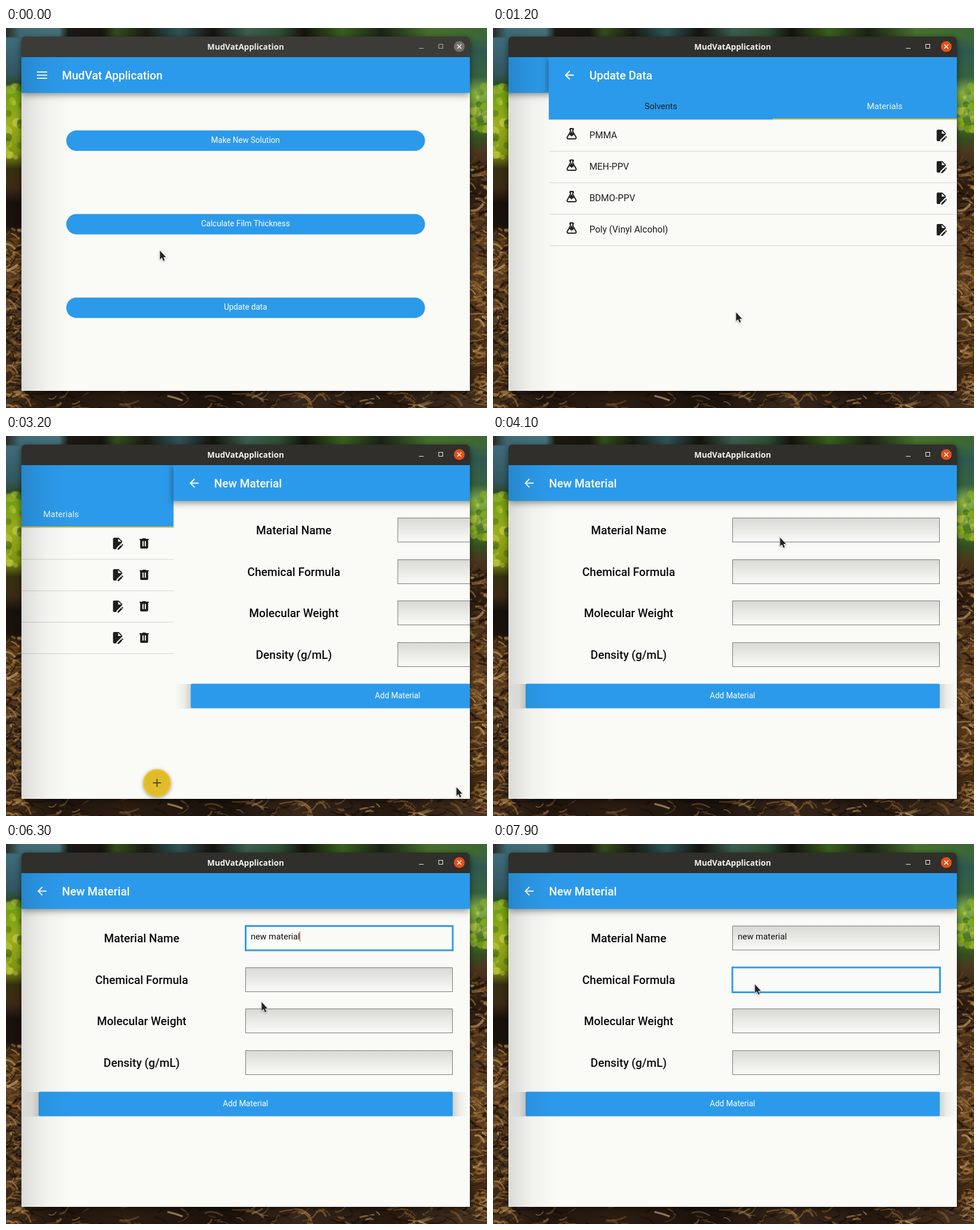
An HTML page with a canvas for the animation above (8 s loop, 842x665 px).

```html
<!DOCTYPE html>
<html lang="en">
<head>
<meta charset="utf-8">
<title>MudVat Application</title>
<style>
  html, body { margin: 0; width: 100%; height: 100%; overflow: hidden; background: #1d150e; }
  canvas { display: block; }
</style>
</head>
<body>
<canvas id="stage" width="842" height="665"></canvas>
<script>
const W = 842, H = 665, LOOP = 8000, STEP = 100;
const WIN = { x: 27, y: 15, r: 812, b: 635, top: 51 };
const PAGE_W = WIN.r - WIN.x;
const BLUE = '#2c9aea', PAPER = '#fafbf7', INK = '#1f1f1d', YELLOW = '#f7c510';
const ROWS = ['PMMA', 'MEH-PPV', 'BDMO-PPV', 'Poly (Vinyl Alcohol)'];
const LABELS = ['Material Name', 'Chemical Formula', 'Molecular Weight', 'Density (g/mL)'];

const ICON = {
  back: new Path2D('M20 11H7.8l5.6-5.6L12 4l-8 8 8 8 1.4-1.4L7.8 13H20z'),
  flask: new Path2D('M5 19a1 1 0 0 0 1 1h12a1 1 0 0 0 1-1l-.2-.6L13 8.4V4h-2v4.4L5.2 18.4zM6 22a3 3 0 0 1-2.5-4.6L9 7.8V6a1 1 0 0 1-1-1V4a2 2 0 0 1 2-2h4a2 2 0 0 1 2 2v1a1 1 0 0 1-1 1v1.800L20.500 17.400A3 3 0 0 1 18 22z'),
  drop: new Path2D('M12 8l4.300 6-2.300 1-2 2-2-2-2.300-1z'),
  file: new Path2D('M6 2a2 2 0 0 0-2 2v16a2 2 0 0 0 2 2h4v-1.900l10-10V8l-6-6zM13 3.500L18.500 9H13z'),
  pencil: new Path2D('M20.200 13l-.5.200-1 1 2.100 2.100 1-1c.2-.3.2-.6 0-.8l-1.300-1.300zM18.100 14.800L12 20.900V23h2.100l6.100-6.100z'),
  trash: new Path2D('M9 3v1H4v2h1v13a2 2 0 0 0 2 2h10a2 2 0 0 0 2-2V6h1V4h-5V3zM9 8h2v9H9zM13 8h2v9h-2z'),
  pointer: new Path2D('M0 0V15.500L3.500 12.300 5.900 18 8.300 17 6 11.400H10.400z')
};

// Pointer route: time, x, y
const ROUTE = [
  [0, 269, 389], [400, 358, 445], [500, 358, 445], [900, 425, 497], [1400, 425, 497],
  [2100, 725, 592], [2300, 749, 601], [2600, 798, 636], [2700, 798, 636], [2900, 788, 614],
  [3200, 788, 614], [3600, 602, 402], [3900, 517, 217], [4000, 517, 217], [4100, 502, 177],
  [4300, 502, 177], [4700, 440, 331], [4800, 447, 276], [6900, 447, 276], [7500, 458, 245]
];
// Typed text: time, letters shown
const TYPING = [[5100, 1], [5200, 3], [5500, 4], [5600, 5], [5700, 6], [6000, 7], [6100, 8], [6200, 10], [6300, 12]];

const c = document.getElementById('stage').getContext('2d');

function rect(x, y, w, h, fill, g = c) {
  g.fillStyle = fill;
  g.fillRect(x, y, w, h);
}

function text(str, x, y, font, fill, align = 'left') {
  c.font = font;
  c.fillStyle = fill;
  c.textAlign = align;
  c.fillText(str, x, y);
}

const roboto = (size, weight = 400) => `${weight} ${size}px Roboto, sans-serif`;

function pill(x, y, w, h, r, fill) {
  c.beginPath();
  c.roundRect(x, y, w, h, r);
  c.fillStyle = fill;
  c.fill();
}

function disc(x, y, r, fill) {
  c.beginPath();
  c.arc(x, y, r, 0, 7);
  c.fillStyle = fill;
  c.fill();
}

function line(points, width, colour) {
  c.beginPath();
  points.forEach(([x, y], i) => i ? c.lineTo(x, y) : c.moveTo(x, y));
  c.lineWidth = width;
  c.strokeStyle = colour;
  c.stroke();
}

function icon(path, x, y, fill = INK) {
  c.save();
  c.translate(x, y);
  c.fillStyle = fill;
  c.fill(path, 'evenodd');
  c.restore();
}

function ramp(g, x0, y0, x1, y1, stops) {
  const grad = g.createLinearGradient(x0, y0, x1, y1);
  stops.forEach(([at, colour]) => grad.addColorStop(at, colour));
  return grad;
}

function withShadow(alpha, blur, dy, draw) {
  c.save();
  c.shadowColor = `rgba(0,0,0,${alpha})`;
  c.shadowBlur = blur;
  c.shadowOffsetY = dy;
  draw();
  c.restore();
}

// Blurred woodland behind the window
function makeForest() {
  const sheet = document.createElement('canvas');
  sheet.width = W;
  sheet.height = H;
  const g = sheet.getContext('2d');
  let seed = 11;
  const rnd = () => (seed = (seed * 16807) % 2147483647) / 2147483647;
  const pick = list => list[Math.floor(rnd() * list.length)];

  rect(0, 0, W, H, '#2a1c11', g);
  rect(0, 0, 40, H, ramp(g, 0, 0, 0, H, [
    [0, '#2b3a34'], [.03, '#3f6b7a'], [.12, '#31565f'], [.145, '#2d4a2c'], [.17, '#709b14'],
    [.25, '#9cae1b'], [.33, '#7f9312'], [.37, '#34300f'], [.42, '#3d2a16'], [.46, '#17110c'],
    [.52, '#1b120c'], [.56, '#553819'], [.75, '#573d22'], [1, '#2d1f13']]), g);
  rect(802, 0, 40, H, ramp(g, 0, 0, 0, H, [
    [0, '#45702f'], [.06, '#2f5950'], [.13, '#37623f'], [.17, '#86b04e'], [.22, '#5c8c31'],
    [.29, '#35501f'], [.33, '#4c351d'], [.42, '#2b1c11'], [.55, '#5b3d20'], [.8, '#543719'], [1, '#31210f']]), g);
  rect(0, 0, W, 16, ramp(g, 0, 0, W, 0, [
    [0, '#2a2a22'], [.03, '#3f6a75'], [.11, '#44717a'], [.13, '#1d1a12'], [.2, '#17150f'],
    [.23, '#33501d'], [.29, '#1a1a12'], [.36, '#2f5558'], [.43, '#15130d'], [.5, '#3c5f50'],
    [.57, '#2e5033'], [.62, '#15130d'], [.7, '#39611f'], [.78, '#1b2316'], [.88, '#47712e'], [1, '#3b6635']]), g);
  rect(0, 634, W, 31, ramp(g, 0, 0, W, 0, [
    [0, '#4a321b'], [.1, '#21160f'], [.25, '#2c1d12'], [.45, '#1b130d'], [.6, '#37261a'], [.8, '#251910'], [1, '#4b3520']]), g);

  const leaves = ['#b5c430', '#88b01e', '#c7cc49', '#3f6716', '#5f8a18'];
  for (let i = 0; i < 60; i++) {
    const right = i % 2;
    g.globalAlpha = .35 + rnd() * .35;
    g.fillStyle = pick(leaves);
    g.beginPath();
    g.arc((right ? 812 : 0) + rnd() * 28, 102 + rnd() * (right ? 75 : 125), 2 + rnd() * 7, 0, 7);
    g.fill();
  }
  const twigs = ['#a4743c', '#c49a61', '#1a100a', '#150d08', '#7c5127', '#2a190d', '#8f6530'];
  const twig = (x, y, len) => {
    const a = (rnd() - .5) * 1.6;
    g.globalAlpha = .35 + rnd() * .45;
    g.strokeStyle = pick(twigs);
    g.lineWidth = 1 + rnd() * 3.5;
    g.beginPath();
    g.moveTo(x, y);
    g.quadraticCurveTo(x + len * .5, y + (rnd() - .5) * 12, x + Math.cos(a) * len, y + Math.sin(a) * len);
    g.stroke();
  };
  for (let i = 0; i < 230; i++) twig(-8 + rnd() * 32, 350 + rnd() * 310, 6 + rnd() * 20);
  for (let i = 0; i < 260; i++) twig(806 + rnd() * 34, 235 + rnd() * 425, 6 + rnd() * 20);
  for (let i = 0; i < 150; i++) twig(rnd() * W, 636 + rnd() * 29, 8 + rnd() * 26);
  return sheet;
}
const forest = makeForest();

function titleBar(active) {
  withShadow(.55, 12, 3, () => pill(WIN.x, WIN.y, PAGE_W, WIN.b - WIN.y, [8, 8, 0, 0], '#302f2b'));
  pill(WIN.x, WIN.y, PAGE_W, 36, [8, 8, 0, 0], active ? '#302f2b' : '#3d3b37');
  text('MudVatApplication', 419.5, 38, '700 14px "Open Sans", "Noto Sans", sans-serif', active ? '#f6f5f2' : '#eeedea', 'center');
  const tone = active ? '#f3f2ef' : '#bab8b3';
  rect(723, 35, 8, 1, tone);
  c.lineWidth = 1;
  c.strokeStyle = tone;
  c.strokeRect(757.5, 28.5, 7, 7);
  disc(793.500, 32.500, 9.500, active ? '#e2511d' : '#74716b');
  line([[790, 29], [797, 36]], 1.500, '#fff');
  line([[797, 29], [790, 36]], 1.500, '#fff');
}

function toolbar(title, menu) {
  withShadow(.5, 12, 2, () => rect(WIN.x, WIN.top, PAGE_W, 62.5, BLUE));
  if (menu) for (const y of [76, 81.500, 87]) rect(54, y, 18, 2, '#fff');
  else icon(ICON.back, 51, 70.500, '#fff');
  text(title, 98, 89.500, roboto(20, 500), '#fff');
}

function homePage() {
  toolbar('MudVat Application', true);
  ['Make New Solution', 'Calculate Film Thickness', 'Update data'].forEach((label, i) => {
    const y = 179.300 + i * 146.200;
    pill(105.500, y, 628, 35.700, 17.800, BLUE);
    text(label, 419.200, y + 21.700, roboto(14), '#fff', 'center');
  });
}

function listPage(ripple) {
  toolbar('Update Data');
  rect(WIN.x, 110, PAGE_W, 50.500, BLUE);
  rect(WIN.x, 160.500, PAGE_W, 20, PAPER);
  text('Solvents', 223.200, 142, roboto(15), '#16212c', 'center');
  text('Materials', 615, 142, roboto(15), '#e9f4fd', 'center');
  rect(419.500, 158.500, 392.500, 2, '#efc92c');
  ROWS.forEach((name, i) => {
    const y = i * 55;
    icon(ICON.flask, 55, 173 + y);
    icon(ICON.drop, 55, 173 + y);
    text(name, 98, 193 + y, roboto(16), INK);
    icon(ICON.file, 702, 176 + y);
    icon(ICON.pencil, 702, 176 + y);
    icon(ICON.trash, 748.500, 176 + y);
    rect(WIN.x, 215 + y, PAGE_W, 1.500, '#dfe0dd');
  });
  withShadow(.4, 7, 2, () => disc(783, 607, 24, YELLOW));
  if (ripple > 0) disc(783, 607, 22 * ripple, 'rgba(190,175,80,.42)');
  const plus = ripple > 0 ? '#4d4b2c' : INK;
  rect(776, 606, 14, 2, plus);
  rect(782, 600, 2, 14, plus);
}

// Outline closes in on the field after it takes focus
function focusRing(y, age) {
  const out = 60 * Math.pow(1 - Math.min(1, age / 300), 3);
  c.save();
  c.globalAlpha = Math.min(1, age / 200);
  c.lineWidth = 3;
  c.strokeStyle = BLUE;
  c.strokeRect(419.500 - out, y + .5 - out, 362.500 + 2 * out, 42.500 + 2 * out);
  c.restore();
}

function formPage(t) {
  toolbar('New Material');
  const ages = [t < 7700 ? t - 4345 : 0, t - 7660];
  LABELS.forEach((label, i) => {
    const y = Math.round(143 + i * 72.600);
    text(label, 237.500, y + 29, roboto(20, 500), '#0c0c0c', 'center');
    const focused = ages[i] >= 50;
    rect(419, y, 363, 43, '#777875');
    rect(420, y + 1, 361, 41, focused ? PAPER : ramp(c, 0, y, 0, y + 42, [[0, '#d8d9d5'], [1, '#fafbf7']]));
    if (focused) {
      rect(419, y, 363, 43, PAPER);
      focusRing(y, ages[i]);
    }
  });

  const count = TYPING.reduce((n, [at, k]) => t >= at ? k : n, 0);
  const typed = 'new material'.slice(0, count);
  text(typed, 428.500, 167, roboto(15), '#111');
  const caret = (t >= 4400 && t < 6800) || (t >= 7300 && t < 7700);
  if (caret) rect(Math.floor(428.500 + c.measureText(typed).width), 153, 1, 18, '#d8392b');

  const dark = 'rgba(0,0,0,.17)', clear = 'rgba(0,0,0,0)';
  rect(29, 434, 28, 43, ramp(c, 57, 0, 29, 0, [[0, dark], [.4, 'rgba(0,0,0,.06)'], [1, clear]]));
  rect(782, 434, 28, 43, ramp(c, 782, 0, 810, 0, [[0, dark], [.4, 'rgba(0,0,0,.06)'], [1, clear]]));
  pill(57, 433.500, 725, 43, 2, BLUE);
  text('Add Material', 419.200, 459, roboto(14), '#fff', 'center');
}

function slide(t, start) {
  const p = Math.min(1, Math.max(0, (t - start) / 400));
  return p > .9 ? 1 : 1 - (1 - p) * (1 - p);
}

function page(shift, draw) {
  if (Math.abs(shift) >= PAGE_W) return;
  c.save();
  c.translate(shift, 0);
  draw();
  c.restore();
}

function pointer(t) {
  let i = ROUTE.findIndex(k => k[0] > t);
  if (i < 0) i = ROUTE.length - 1;
  const [t0, x0, y0] = ROUTE[i - 1], [t1, x1, y1] = ROUTE[i];
  const p = Math.min(1, (t - t0) / (t1 - t0));
  c.save();
  c.translate(Math.round(x0 + (x1 - x0) * p) + .5, Math.round(y0 + (y1 - y0) * p) + .5);
  c.lineWidth = 1.600;
  c.strokeStyle = '#fff';
  withShadow(.35, 3, 1, () => c.stroke(ICON.pointer));
  c.fillStyle = '#222';
  c.fill(ICON.pointer);
  c.restore();
}

function draw(t) {
  c.drawImage(forest, 0, 0);
  titleBar(t >= 800);

  c.save();
  c.beginPath();
  c.rect(WIN.x, WIN.top, PAGE_W, WIN.b - WIN.top);
  c.clip();
  rect(WIN.x, WIN.top, PAGE_W, WIN.b - WIN.top, PAPER);
  const a = slide(t, 920), b = slide(t, 3033);
  page(-a * PAGE_W, homePage);
  page((1 - a - b) * PAGE_W, () => listPage(Math.min(1, (t - 2900) / 300)));
  page((1 - b) * PAGE_W, () => formPage(t));
  // Edge shade of the closed drawer stays with the window
  rect(WIN.x, WIN.top, 85, WIN.b - WIN.top, ramp(c, WIN.x, 0, WIN.x + 85, 0, [
    [0, 'rgba(0,0,0,.13)'], [.2, 'rgba(0,0,0,.085)'], [.5, 'rgba(0,0,0,.035)'], [1, 'rgba(0,0,0,0)']]));
  c.restore();

  pointer(t);
}

function tick() {
  draw(Math.floor((performance.now() % LOOP) / STEP) * STEP);
  requestAnimationFrame(tick);
}
tick();
</script>
</body>
</html>
```
